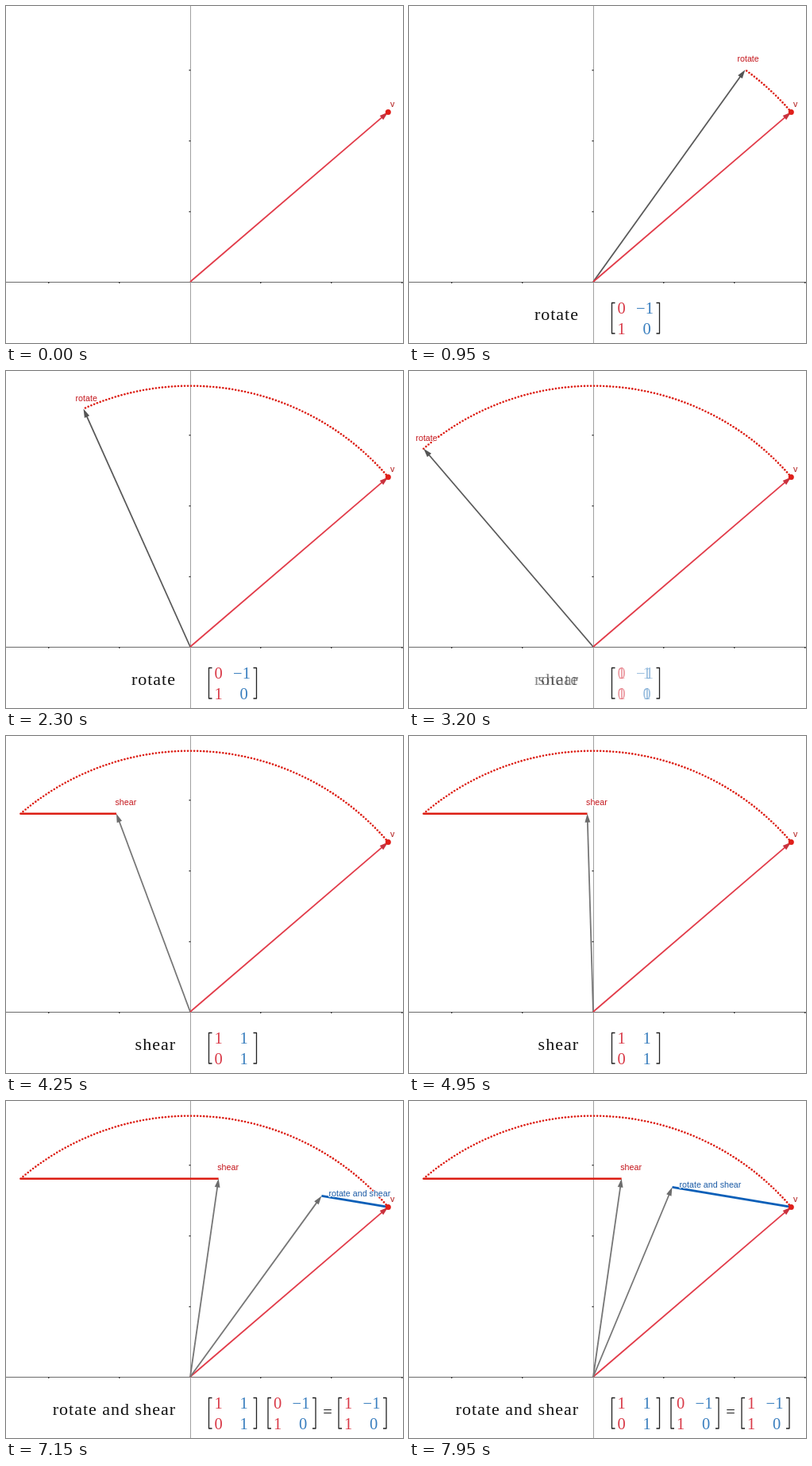
Animation, 500 px wide and 424 px high, one loop 8 s. Source, as an HTML page with a canvas:

```html
<!DOCTYPE html>
<html lang="en">
<head>
<meta charset="utf-8">
<title>Rotate and shear</title>
<style>
  html, body { margin: 0; width: 100%; height: 100%; overflow: hidden; background: #fff; }
  canvas { display: block; }
</style>
</head>
<body>
<canvas id="stage" width="500" height="424"></canvas>
<script>
const ctx = document.getElementById('stage').getContext('2d');

const LOOP = 8000, STEP = 50, UNIT = 89;
const ORIGIN = [232, 347];
const V = [249.3, 213.6];            // vector v, y pointing up
const RADIUS = Math.hypot(...V), ANGLE = Math.atan2(V[1], V[0]);
const ARC_DOTS = 128;
const RED = '#d93a48', BLUE = '#3a7fbf', TRAIL = '#dc1e14', BLUE_TRAIL = '#0a5fb8';
const LABEL_FONT = '10.7px "Liberation Sans", sans-serif';
const WORD_FONT = '22px "Liberation Serif", serif';
const DIGIT_FONT = '20.5px "Liberation Serif", serif';

const progress = (t, start, duration) => Math.min(1, Math.max(0, (t - start) / duration));
const toStage = ([x, y]) => [ORIGIN[0] + x, ORIGIN[1] - y];
const rotated = p => {
  const a = ANGLE + p * Math.PI / 2;
  return toStage([RADIUS * Math.cos(a), RADIUS * Math.sin(a)]);
};
const sheared = p => toStage([-V[1] + p * V[0], V[0]]);
const combined = p => toStage([V[0] - p * V[1], V[1] + p * (V[0] - V[1])]);

function line(from, to, color, width) {
  ctx.strokeStyle = color;
  ctx.lineWidth = width;
  ctx.beginPath();
  ctx.moveTo(...from);
  ctx.lineTo(...to);
  ctx.stroke();
}

function dot([x, y], radius, color) {
  ctx.fillStyle = color;
  ctx.beginPath();
  ctx.arc(x, y, radius, 0, 2 * Math.PI);
  ctx.fill();
}

function arrow(tip, color, headColor = color) {
  const a = Math.atan2(tip[1] - ORIGIN[1], tip[0] - ORIGIN[0]);
  const length = Math.hypot(tip[0] - ORIGIN[0], tip[1] - ORIGIN[1]);
  ctx.save();
  ctx.translate(...ORIGIN);
  ctx.rotate(a);
  line([0, 0], [length - 8, 0], color, 1.8);
  ctx.fillStyle = headColor;
  ctx.beginPath();
  ctx.moveTo(length, 0);
  ctx.lineTo(length - 11, -3.4);
  ctx.lineTo(length - 11, 3.4);
  ctx.fill();
  ctx.restore();
}

function label(text, [x, y], color) {
  ctx.font = LABEL_FONT;
  ctx.textAlign = 'left';
  ctx.lineJoin = 'round';
  ctx.strokeStyle = '#fff';
  ctx.lineWidth = 2;
  ctx.strokeText(text, x, y);
  ctx.fillStyle = color;
  ctx.fillText(text, x, y);
}

function word(text, right, alpha) {
  ctx.globalAlpha = alpha;
  ctx.font = WORD_FONT;
  ctx.letterSpacing = '1px';
  ctx.textAlign = 'right';
  ctx.fillStyle = '#111';
  ctx.fillText(text, right, 395);
  const width = ctx.measureText(text).width;
  ctx.letterSpacing = '0px';
  ctx.globalAlpha = 1;
  return width;
}

function brackets(x, alpha) {
  ctx.globalAlpha = alpha;
  ctx.strokeStyle = '#222';
  ctx.lineWidth = 1.3;
  for (const [edge, lip] of [[x, 4], [x + 60, -4]]) {
    ctx.beginPath();
    ctx.moveTo(edge + lip, 373.5);
    ctx.lineTo(edge, 373.5);
    ctx.lineTo(edge, 412);
    ctx.lineTo(edge + lip, 412);
    ctx.stroke();
  }
  ctx.globalAlpha = 1;
}

function entries(x, values, alpha) {
  ctx.globalAlpha = alpha;
  ctx.font = DIGIT_FONT;
  ctx.textAlign = 'center';
  values.forEach((value, i) => {
    const column = i % 2, baseline = i < 2 ? 387 : 412.5;
    const center = x + 12 + (column ? (value.length > 1 ? 29.5 : 32) : 0);
    ctx.fillStyle = column ? BLUE : RED;
    ctx.fillText(value, center, baseline);
  });
  ctx.globalAlpha = 1;
}

function matrix(x, values, alpha) {
  brackets(x, alpha);
  entries(x, values, alpha);
}

function axes() {
  line([0, 347.5], [500, 347.5], '#6c6c6c', 1);
  line([232.5, 0], [232.5, 424], '#a0a0a0', 1);
  ctx.fillStyle = '#444';
  for (const n of [-2, -1, 1, 2, 3]) ctx.fillRect(ORIGIN[0] + n * UNIT - 1, 347, 1.5, 2);
  for (const n of [1, 2, 3]) ctx.fillRect(230.5, ORIGIN[1] - n * UNIT, 2, 1.5);
}

function formulas(t) {
  const rotateIn = progress(t, 600, 300), shearIn = progress(t, 3050, 300);
  const productIn = progress(t, 5950, 350), resultIn = progress(t, 6130, 400);
  const rotateMatrix = ['0', '−1', '1', '0'];

  brackets(255.5, rotateIn);
  word('rotate', 214, rotateIn * (1 - shearIn));
  entries(255.5, rotateMatrix, rotateIn * (1 - shearIn));
  const shearWidth = word('shear', 214, shearIn);
  entries(255.5, ['1', '1', '0', '1'], shearIn);

  word('rotate and ', 214 - shearWidth, resultIn);
  matrix(330, rotateMatrix, productIn);
  matrix(419, ['1', '−1', '1', '0'], resultIn);
  ctx.globalAlpha = productIn;
  ctx.fillStyle = '#222';
  ctx.fillText('=', 405, 397.5);
  ctx.globalAlpha = 1;
}

function draw(t) {
  ctx.fillStyle = '#fff';
  ctx.fillRect(0, 0, 500, 424);
  ctx.lineCap = 'butt';
  axes();

  const rotation = progress(t, 640, 2030);
  const shear = progress(t, 3263, 2040);
  const both = progress(t, 6132, 2593);
  const v = toStage(V);

  if (rotation) {
    for (let i = 0; i <= ARC_DOTS * rotation; i++) dot(rotated(i / ARC_DOTS), 1.3, TRAIL);
  }
  const movingTip = shear ? sheared(shear) : rotated(rotation);
  if (shear) line(sheared(0), movingTip, TRAIL, 2.5);
  if (rotation) arrow(movingTip, shear ? '#777' : '#5a5a5a', shear ? '#6c6c6c' : '#555');

  arrow(v, '#e23b49', '#c9323e');
  const blueTip = combined(both);
  if (both) {
    line(v, blueTip, BLUE_TRAIL, 2.6);
    arrow(blueTip, '#777', '#6c6c6c');
  }
  dot(v, 3.5, '#e01f1a');

  label('v', [484, 127], '#b01818');
  if (rotation) {
    const [x, y] = movingTip;
    if (shear) label('shear', [x - 1.5, y - 10.5], '#c4161c');
    else label('rotate', [x - 10, y - 10], '#c4161c');
  }
  if (both) label('rotate and shear', [blueTip[0] + 9, blueTip[1] + 1], '#1a5aa5');

  formulas(t);
}

function frame(now) {
  draw(Math.floor((now % LOOP) / STEP) * STEP);
  requestAnimationFrame(frame);
}
draw(0);
requestAnimationFrame(frame);
</script>
</body>
</html>
```
